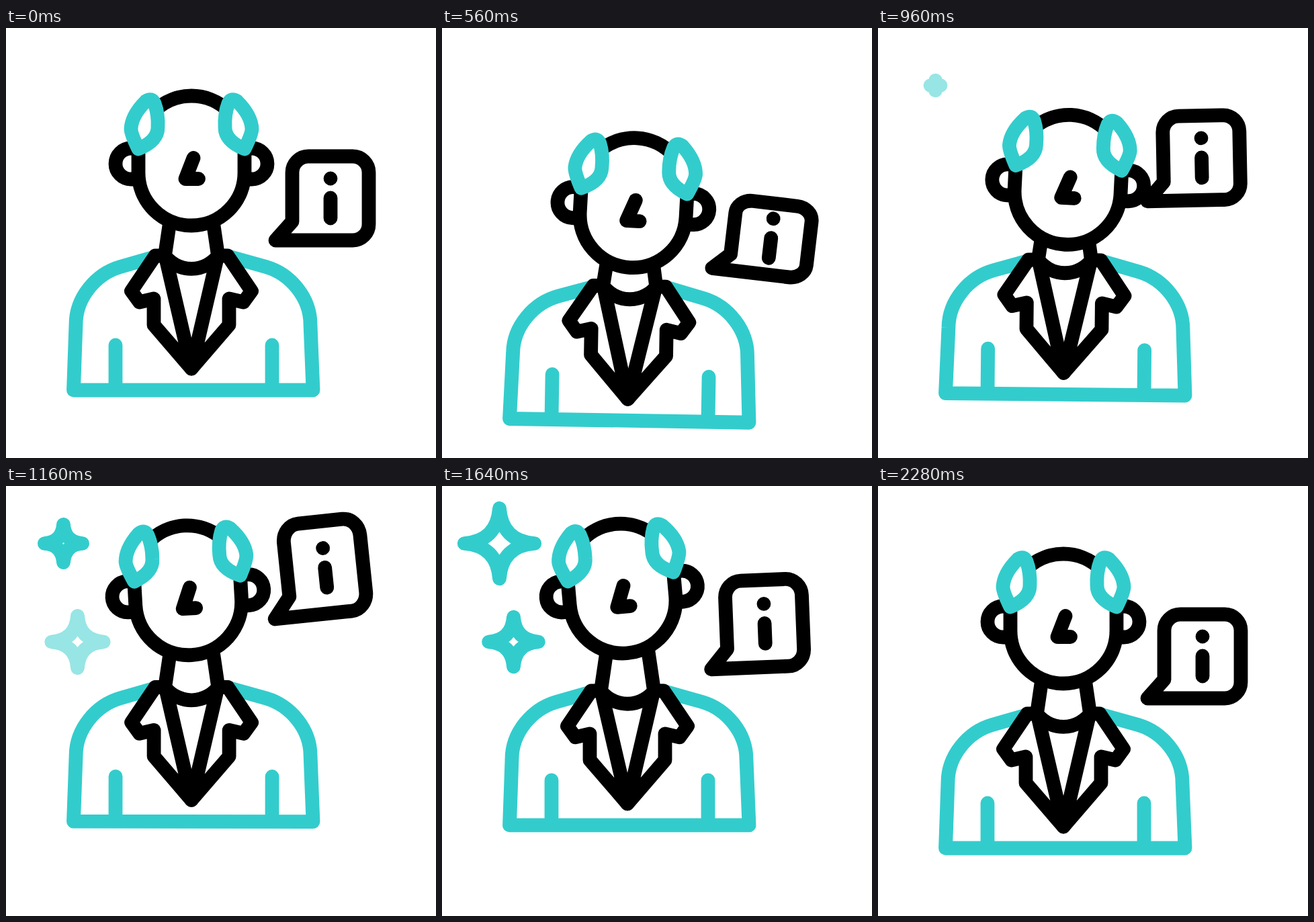
Recreate the animation shown at these times as an HTML page. Size 640 by 640 pixels, loop 2.4 s.

```html
<!DOCTYPE html>
<html lang="en">
<head>
<meta charset="utf-8">
<title>Consultant with info bubble</title>
<style>
  html, body { margin: 0; width: 100%; height: 100%; overflow: hidden; background: #fff; }
  svg { display: block; width: 640px; height: 640px; }
  path { fill: none; stroke: #000; stroke-width: 20.8; stroke-linecap: round; stroke-linejoin: round; }
  .teal { stroke: #33cccc; }
  .solid { fill: #fff; }
  .steady { vector-effect: non-scaling-stroke; }
</style>
</head>
<body>
<svg viewBox="0 0 640 640">
  <defs>
    <path id="star" class="teal steady" d="M0-52.5Q3.75-3.75 52.5 0Q3.75 3.75 0 52.5Q-3.75 3.75-52.5 0Q-3.75-3.75 0-52.5Z"/>
    <path id="ear" d="M196 179H186A23 23 0 0 0 186 225H196"/>
    <path id="hair" class="teal solid" d="M208 109Q187 130 186 150Q186 158 197 180Q226 168 226 148Q227 128 221 112Q217 103 208 109Z"/>
    <path id="lapel" d="M276 507L237 339H222L186.5 391.5L198.5 408L220 403V442Z"/>
  </defs>

  <use id="big" href="#star"/>
  <use id="small" href="#star"/>

  <g id="body">
    <path class="teal" d="M224 340L170 355.5C134 366 104 401 104 441L100.5 539H457L453 441C453 401 423 366 387 355.5L328 339M163 472V539M396 472V539"/>
    <path stroke-linecap="butt" d="M248 260L237 335M304 260L315 335M235 337A50 50 0 0 0 317 337"/>
    <use href="#lapel"/>
    <use href="#lapel" transform="matrix(-1 0 0 1 552 0)"/>
    <g id="head">
      <use href="#ear"/>
      <use href="#ear" transform="matrix(-1 0 0 1 552 0)"/>
      <path class="solid" d="M197 180A79 79 0 0 1 355 180V215A79 79 0 0 1 197 215Z"/>
      <use href="#hair"/>
      <use href="#hair" transform="matrix(-1 0 0 1 552 0)"/>
      <path d="M279 193.5L267 224.5H286.5"/>
    </g>
  </g>

  <g id="bubble">
    <path id="box" class="steady" d="M401 316L426 288V215A24 24 0 0 1 450 191H516A24 24 0 0 1 540 215V292A24 24 0 0 1 516 316Z"/>
    <path id="info" d="M483 224h.01M483 253V283"/>
  </g>
</svg>
<script>
const LOOP = 2400, STEP = 40, REST = 2280;

const clamp = x => Math.min(1, Math.max(0, x));

// S-curve from 0 to 1: power sets the steepness, lead below 1 brings it forward.
function ease(x, power, lead) {
  const a = clamp(x) ** power, b = (lead * (1 - clamp(x))) ** power;
  return a / (a + b);
}

// A part dips, rises and settles; the result maps its two extremes to a value.
function swing(t, start, low, high, lead) {
  const dip = ease((t - start) / (low - start), 1.86, .8);
  const rise = ease((t - low) / (high - low), 1.86, .8);
  const settle = ease((t - high) / (REST - high), 2.85, lead);
  return (down, up) => (down * dip * (1 - rise) + up * rise) * (1 - settle);
}

const part = id => document.getElementById(id);
const place = (id, value) => part(id).setAttribute("transform", value);

// Stars swell around a peak time and fade in and out.
function star(id, t, x, y, { size, peak, span, from }) {
  const d = clamp(Math.abs(t - peak) / span);
  const scale = size * Math.cos(d * Math.PI / 2) ** 2;
  place(id, `translate(${x} ${y}) scale(${scale})`);
  part(id).setAttribute("opacity", clamp((t - from) / 160) * clamp((1860 - t) / 180));
}

function draw(t) {
  const body = swing(t, 200, 720, 1280, .84);
  const head = swing(t, 300, 820, 1380, 1);
  const bubble = swing(t, 200, 640, 1280, .45);
  const stretch = bubble(-.155, .112);

  place("body", `translate(0 ${body(52, -45)}) rotate(${body(1.06, 0)} 279 539)`);
  place("head", `translate(0 ${head(28.5, -12)}) rotate(${head(3.75, -5.4)} 276 296)`);
  place("bubble", `translate(0 ${bubble(43, -125)}) rotate(${bubble(7, -6.5)} 401 324)`);
  place("box", `translate(0 316) scale(1 ${1 + stretch}) translate(0 -316)`);
  place("info", `translate(0 ${-55 * stretch})`);
  star("big", t, 85.5, 85.5, { size: 1.05, peak: 1530, span: 750, from: 880 });
  star("small", t, 106.5, 232, { size: .87, peak: 1385, span: 880, from: 1080 });
}

// The picture is held for one step at a time.
const start = performance.now();
function tick() {
  const t = (performance.now() - start) % LOOP;
  draw(Math.floor(t / STEP) * STEP);
  requestAnimationFrame(tick);
}
tick();
</script>
</body>
</html>
```
